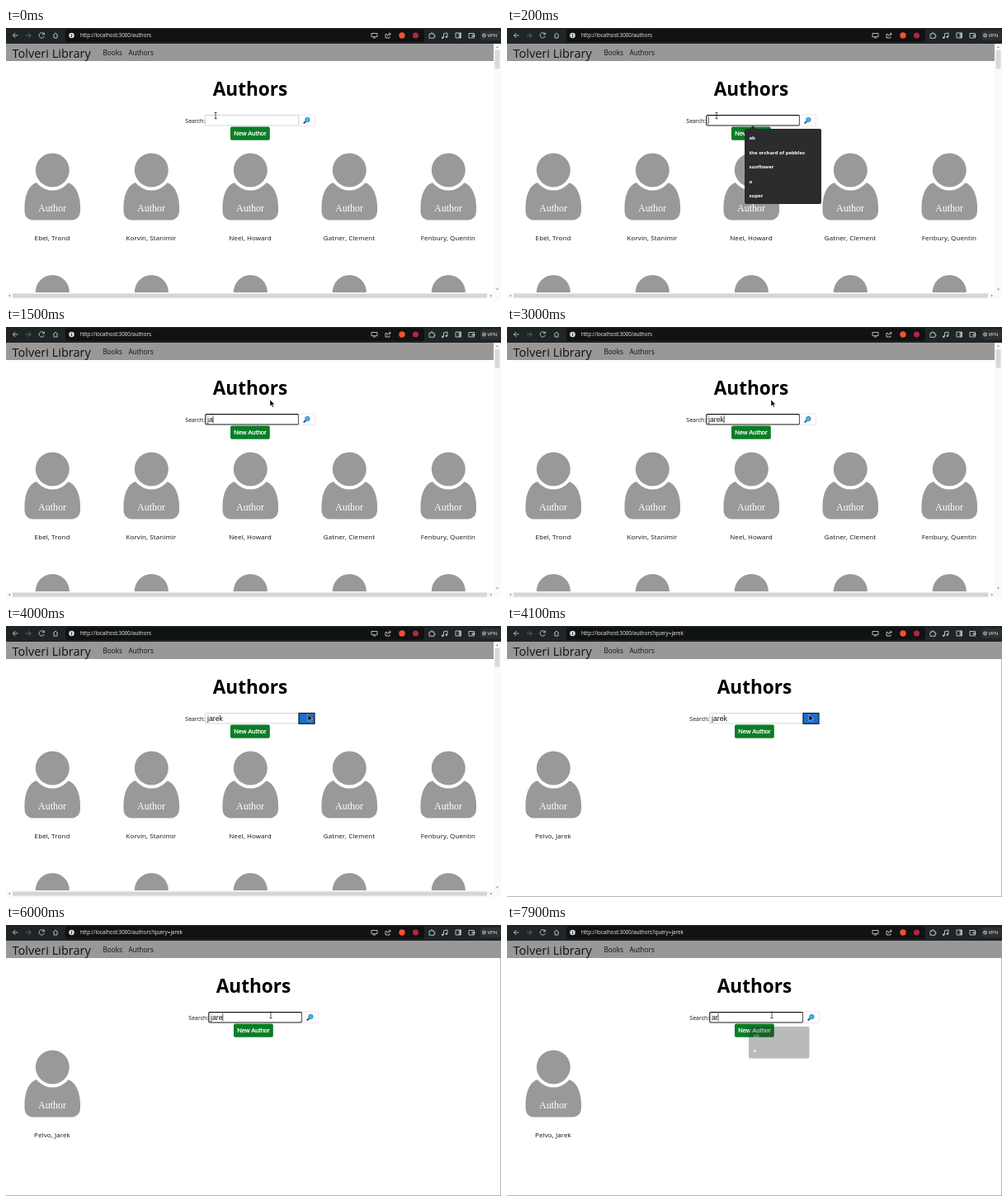
Write an HTML page that moves like this. It is 600 by 328 pixels and loops after 8000 ms.

```html
<!DOCTYPE html>
<html lang="en">
<head>
<meta charset="utf-8">
<title>Library authors search</title>
<style>
  html, body { margin: 0; width: 100%; height: 100%; overflow: hidden; background: #fff; }
  svg { display: block; width: 600px; height: 328px; }
  text { font-family: "Open Sans", "Noto Sans", sans-serif; fill: #111; white-space: pre; }
  .arial { font-family: "Liberation Sans", Arial, sans-serif; }
  .serif { font-family: "Liberation Serif", Times, serif; }
</style>
</head>
<body>
<svg id="stage" viewBox="0 0 600 328"></svg>
<script>
const LOOP = 8000, TICK = 100;
const NAMES = ["Ebel, Trond", "Korvin, Stanimir", "Neel, Howard", "Gatner, Clement", "Fenbury, Quentin"];
const HINTS = ["ab", "the orchard of pebbles", "sunflower", "a", "super"];
const QUERY = "jarek";

// [time, value]: the last entry reached applies
const TYPED = [[0, ""], [1500, "ja"], [1600, "jar"], [1900, "jare"], [2600, QUERY],
               [5600, "jare"], [6800, ""], [7900, "ar"]];
// [time, x, y]: straight moves in between
const MOUSE = [[0, 254, 106], [800, 254, 106], [1100, 320, 88], [3500, 320, 88],
               [3900, 366, 107], [4300, 366, 107], [5000, 321, 109], [LOOP, 321, 109]];

const stage = document.getElementById("stage");
const pen = document.createElement("canvas").getContext("2d");
pen.font = '8.7px "Liberation Sans", Arial, sans-serif';

const rect = (x, y, w, h, fill, more = "") =>
  `<rect x="${x}" y="${y}" width="${w}" height="${h}" fill="${fill}" ${more}/>`;
const disc = (x, y, r, fill) => `<circle cx="${x}" cy="${y}" r="${r}" fill="${fill}"/>`;
const line = (d, color, width = 1) =>
  `<path d="${d}" fill="none" stroke="${color}" stroke-width="${width}"/>`;
const shape = (d, fill, more = "") => `<path d="${d}" fill="${fill}" ${more}/>`;
const text = (x, y, size, str, more = "") =>
  `<text x="${x}" y="${y}" font-size="${size}" ${more}>${str}</text>`;
const MID = 'text-anchor="middle"';
const WHITE = 'style="fill:#fff"';

function latest(list, t) {
  return list.filter(k => k[0] <= t).pop()[1];
}

function mouseAt(t) {
  const i = MOUSE.findIndex(k => k[0] > t);
  const [t0, x0, y0] = MOUSE[i - 1], [t1, x1, y1] = MOUSE[i];
  const p = (t - t0) / (t1 - t0);
  return [x0 + (x1 - x0) * p, y0 + (y1 - y0) * p];
}

function toolbar(url) {
  const icons =
    "M14.5 9H8.5M11.3 6L8.3 9L11.3 12" +
    "M46 7.2A3.2 3.2 0 1 0 46.3 10M46.4 5.5V7.8H44" +
    "M57 9L60 6L63 9M58 8.5V12H62V8.5" +
    "M443 6.5H450V10.7H443ZM445 12H448" +
    "M462 7.5H460V12H465V10.5M462 10Q462 7.3 466 7.3M464.5 5.5L466.4 7.3L464.5 9" +
    "M513 7.3H515V6H517V7.3H519V9.2H520V10.5H519V12.3H513Z" +
    "M530.5 11.5V6.8L535 6V10.5" +
    "M545 6H551.5V12H545ZM549.2 6V12M550.4 6V12" +
    "M561 6.5H567.5V12H561ZM565 8.7H568V10.2H565Z";
  return rect(0, 0, 600, 19, "#1f2527") +
    rect(72, 1.5, 435, 15.5, "#101214", 'rx="3"') +
    line(icons, "#c9cacd", 0.9) +
    line("M24 9H30M27.3 6L30.3 9L27.3 12", "#6d6f74", 0.9) +
    disc(79.5, 9, 3.3, "#d5d6d8") + line("M79.5 7V7.8M79.5 8.5V11", "#101214", 0.9) +
    text(90, 11.4, 6.3, url, 'font-weight="500" style="fill:#f2f3f4"') +
    disc(480, 9, 3.7, "#f4512c") + disc(496.5, 9, 3.5, "#b8243c") +
    disc(533.8, 10.8, 1.2, "#c9cacd") + disc(529.3, 11.8, 1.2, "#c9cacd") +
    rect(575, 3, 25, 12, "#2c3033", 'rx="3"') +
    `<circle cx="579.5" cy="9" r="2" fill="none" stroke="#ddd" stroke-width=".8"/>` +
    disc(579.5, 9, 0.8, "#ddd") +
    text(583.5, 11.2, 6, "VPN", 'font-weight="500" style="fill:#f2f3f4"');
}

function navbar() {
  return rect(0, 19, 600, 21, "#9a9896") +
    text(7.5, 35.8, 14.5, "Tolveri Library") +
    text(117.5, 33, 8.2, "Books") + text(148.5, 33, 8.2, "Authors");
}

function author(x, y, name) {
  const body = "M38 187C27 189 22.5 204 22.5 217V221C22.5 229 27 232.6 34 232.6" +
               "H78C85 232.6 90 229 90 221V217C90 204 85 189 74 187Z";
  return `<g transform="translate(${x - 56} ${y})">` + shape(body, "#98999b") +
    disc(56.3, 172, 24.5, "#fff") + disc(56.3, 172, 20.5, "#98999b") +
    text(56, 221.5, 12, "Author", `class="serif" ${MID} ${WHITE}`) +
    text(56, 257.2, 8, name, `${MID} letter-spacing=".1"`) + "</g>";
}

function scrollbars() {
  return rect(591, 19, 9, 309, "#fafafa") + rect(0, 320, 600, 8, "#fafafa") +
    rect(592.5, 27, 6, 22.5, "#d9d9d9") + rect(8, 321.5, 575, 5, "#d6d6d6") +
    shape("M594 24L595.5 22L597 24ZM594 315.5L595.5 317.5L597 315.5Z", "#8a8a8a") +
    shape("M5 322.5L3 324L5 325.5ZM587 322.5L589 324L587 325.5Z", "#8a8a8a");
}

function searchForm(dx, typed, focus, hover) {
  const caret = 244.3 + pen.measureText(typed).width;
  let out = text(217.3, 114.8, 7, "Search:") +
    rect(241.8, 105.6, 112.7, 12.4, "#fff",
      focus ? 'stroke="#15181c" stroke-width="1.1" rx="1.2"' : 'stroke="#c9ccd2" stroke-width=".8"') +
    text(244, 114.8, 8.7, typed, 'class="arial"');
  if (focus) out += line(`M${caret} 107.3V116.3`, "#111", 0.7);
  out += hover
    ? rect(355, 105.5, 19, 12.8, "#1a6fd0", 'stroke="#12202f" stroke-width="1.2"')
    : rect(355, 105, 19.5, 13.5, "#fff", 'stroke="#dedede" stroke-width=".7" rx="1.5"') +
      line("M363.4 113L360.7 115.5", "#3c4a55", 1.8) +
      `<circle cx="365.4" cy="111" r="2.7" fill="#39b8f2" stroke="#2a82b8" stroke-width=".9"/>`;
  out += rect(272, 119.5, 47.8, 16.3, "#0a7d25", 'rx="1.8"') +
    text(296, 130.3, 7.6, "New Author",
      `class="arial" ${MID} style="fill:#fff;stroke:#fff;stroke-width:.25"`);
  return `<g transform="translate(${dx} 0)">${out}</g>`;
}

function dropdown(x, y, w, items, opacity, arrow) {
  const rows = items.map((s, i) =>
    text(x + 5.5, y + 13 + 17.5 * i, 6, s, `font-weight="700" ${WHITE}`)).join("");
  return `<g opacity="${opacity}">` + rect(x, y, w, items.length * 17.5 + 3.5, "#2c2c2e", 'rx="2"') +
    (arrow ? shape(`M${x + 6} ${y + .5}L${x + 10} ${y - 4}L${x + 14} ${y + .5}Z`, "#2c2c2e") : "") +
    rows + "</g>";
}

function cursor(x, y, beam) {
  return `<g transform="translate(${x} ${y})">` + (beam
    ? line("M-1.6 -3.7H1.6M0 -3.7V3.7M-1.6 3.7H1.6", "#222", 0.8)
    : shape("M0 0V8L1.9 6.3L3.1 9.2L4.4 8.6L3.2 5.8H5.7Z", "#000",
        'stroke="#fff" stroke-width=".5"')) + "</g>";
}

function scene(t) {
  const found = t >= 4100, dx = found ? 4 : 0;
  const [mx, my] = mouseAt(t);
  const inside = (x0, x1) => mx > x0 + dx && mx < x1 + dx && my > 105 && my < 119;
  const focus = t >= 100 && t < 4000 || t >= 5000;
  const url = "http://localhost:3000/authors" + (found ? "?query=" + QUERY : "");

  let out = rect(0, 0, 600, 328, "#fff") + navbar() +
    text(296 + dx, 82.4, 22.6, "Authors", `font-weight="700" ${MID} style="fill:#000"`) +
    searchForm(dx, latest(TYPED, t), focus, inside(355, 375));
  if (found) {
    out += author(56, 0, "Pelvo, Jarek") + line("M0 327.5H600M599.5 40V328", "#a5a5a5", 0.8);
  } else {
    NAMES.forEach((name, i) => {
      const x = 56 + 120 * i;
      out += author(x, 0, name) + disc(x + 0.3, 319.5, 20.5, "#98999b");
    });
    out += scrollbars();
  }
  out += toolbar(url);
  if (t >= 100 && t < 1500) out += dropdown(288, 122, 93, HINTS, t < 200 ? 0.5 : 1, true);
  if (t >= 7900) out += dropdown(293, 123, 73.5, ["ab", "a"], 0.32, false);
  return out + cursor(mx, my, inside(242, 354));
}

let shown = -1;
function play(now) {
  const t = Math.floor(now % LOOP / TICK) * TICK;
  if (t !== shown) stage.innerHTML = scene(shown = t);
  requestAnimationFrame(play);
}
play(performance.now());
</script>
</body>
</html>
```
